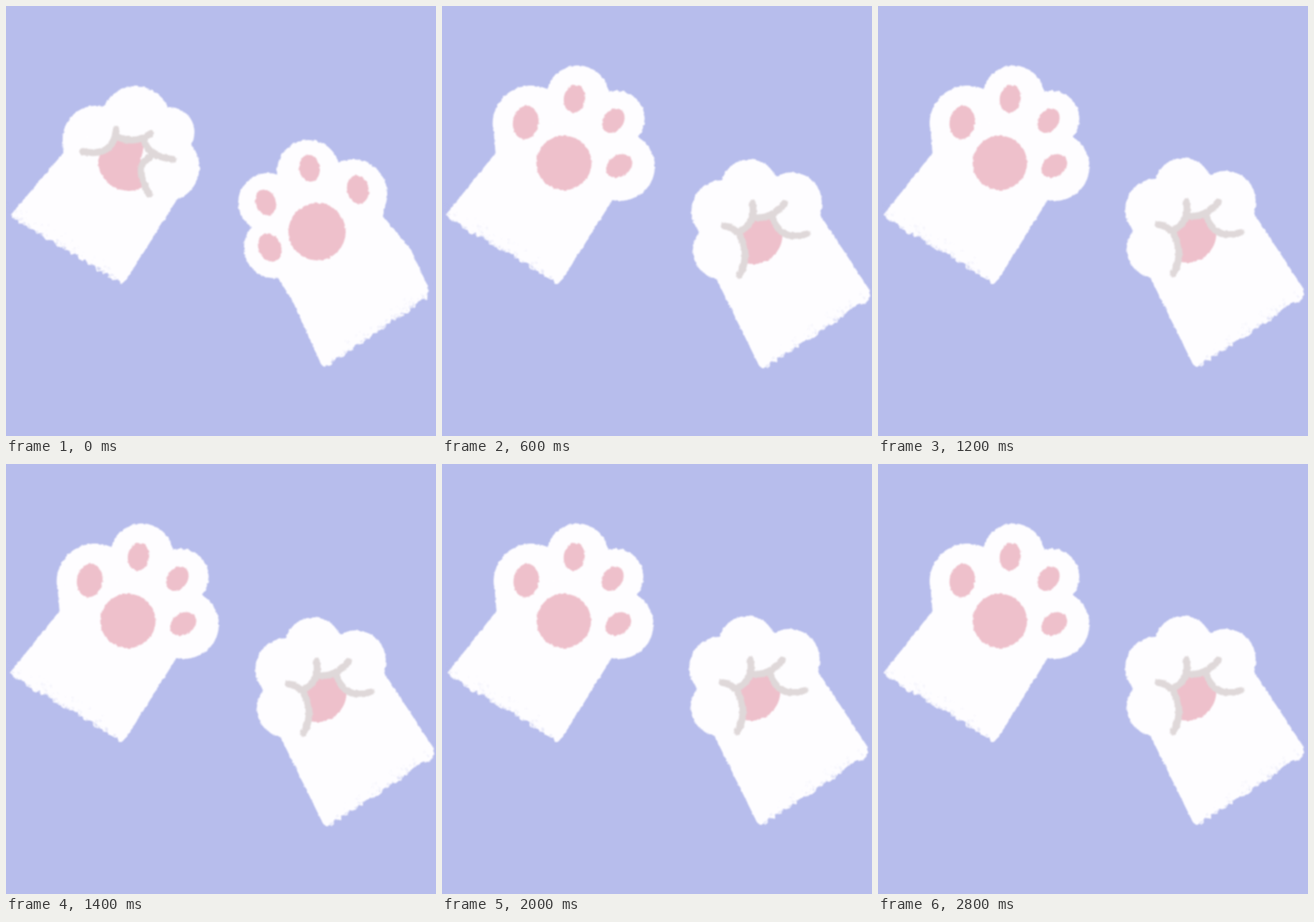
Animation, 600 px wide and 600 px high, one loop 3000 ms. Source, as an HTML page:

```html
<!DOCTYPE html>
<html lang="en">
<head>
<meta charset="utf-8">
<title>Kneading paws</title>
<style>
  html, body { margin: 0; width: 100%; height: 100%; overflow: hidden; background: #b7bdec; }
  svg { display: block; width: 100%; height: 100%; }
  .fur { fill: #fefdff; }
  .pad { fill: #eec0cb; }
  .fold { fill: none; stroke: #dfd8d9; stroke-width: 9.5; stroke-linecap: round; stroke-linejoin: round; }
  .grain { fill: #b7bdec; }
</style>
</head>
<body>
<svg id="stage" viewBox="0 0 600 600">
  <defs>
    <filter id="chalk" filterUnits="userSpaceOnUse" x="0" y="0" width="600" height="600" color-interpolation-filters="sRGB">
      <feTurbulence type="fractalNoise" baseFrequency="0.2" numOctaves="2" seed="4"/>
      <feDisplacementMap in="SourceGraphic" scale="3.5" xChannelSelector="R" yChannelSelector="G"/>
      <feGaussianBlur stdDeviation="0.9"/>
    </filter>
  </defs>
</svg>
<script>
const NS = 'http://www.w3.org/2000/svg';
const stage = document.getElementById('stage');
const STEP = 200, LOOP = 3000;

function add(parent, tag, attrs) {
  const el = document.createElementNS(NS, tag);
  for (const key in attrs) el.setAttribute(key, attrs[key]);
  return parent.appendChild(el);
}

function random(seed) {
  return () => (seed = (seed * 16807) % 2147483647) / 2147483647;
}

function circle(parent, name, [cx, cy, r], opacity = 1) {
  add(parent, 'circle', { class: name, cx, cy, r, opacity });
}

// A pad is a slightly tall ellipse: centre, mean radius, tilt.
function pad(parent, [cx, cy, r, tilt]) {
  add(parent, 'ellipse', {
    class: 'pad', cx, cy, rx: r * 0.86, ry: r * 1.14,
    transform: `rotate(${tilt} ${cx} ${cy})`
  });
}

// Splits the hem into ragged points, each pushed a little along its normal.
function fray([[x0, y0], [x1, y1]], rnd) {
  const length = Math.hypot(x1 - x0, y1 - y0), count = Math.round(length / 4);
  return Array.from({ length: count + 1 }, (_, i) => {
    const t = i / count, push = (rnd() - 0.5) * 6 / length;
    return [x0 + (x1 - x0) * t - (y1 - y0) * push, y0 + (y1 - y0) * t + (x1 - x0) * push];
  });
}

// Chalk gaps, dense at the hem and thinning out up the arm.
function speckle(paw, [[x0, y0], [x1, y1]], rnd) {
  const nx = (y1 - y0) * Math.sign(x0 - x1), ny = -Math.abs(x1 - x0);
  const length = Math.hypot(nx, ny);
  for (let i = 0; i < 90; i++) {
    const t = 0.04 + 0.92 * rnd(), depth = 2 + 40 * rnd() ** 3;
    const x = x0 + (x1 - x0) * t + nx / length * depth;
    const y = y0 + (y1 - y0) * t + ny / length * depth;
    circle(paw, 'grain', [x, y, 0.6 + 1.1 * rnd()], 0.5 / (1 + depth / 8));
  }
}

// Fur is a round toe per digit plus an arm that ends in a frayed hem.
function makePaw({ toes, arm, hem, pads = [], palm, palmPath, folds, seed }) {
  const rnd = random(seed);
  const paw = add(stage, 'g', { filter: 'url(#chalk)', display: 'none' });
  for (const toe of toes) circle(paw, 'fur', toe);
  add(paw, 'polygon', { class: 'fur', points: [...arm, ...fray(hem, rnd)].join(' ') });
  speckle(paw, hem, rnd);
  for (const p of pads) pad(paw, p);
  if (palm) circle(paw, 'pad', palm);
  if (palmPath) add(paw, 'path', { class: 'pad', d: palmPath });
  if (folds) add(paw, 'path', { class: 'fold', d: folds });
  return paw;
}

const leftClosed = makePaw({
  seed: 11,
  toes: [[126, 186, 47], [181, 161, 49], [228, 176, 35], [222, 225, 48]],
  arm: [[168, 382], [238, 271], [228, 176], [79, 186], [80, 205]],
  hem: [[5, 294], [161, 387]],
  palmPath: 'M152 187L195 185L188 215L192 252A42 42 0 0 1 129 211Z',
  folds: 'M107 203Q150 212 154 172M154 182Q180 194 202 178Q193 182 193 188Q198 210 233 214M202 210Q176 222 200 263'
});

const leftOpen = makePaw({
  seed: 23,
  toes: [[125, 164, 53], [189, 126, 43], [242, 157, 39], [247, 224, 48]],
  arm: [[169, 380], [236, 272], [242, 157], [73, 170], [76, 205]],
  hem: [[6, 294], [162, 387]],
  pads: [[117.5, 162.5, 20.5, 8], [184.5, 129.5, 17, 8], [238, 160, 16, 35], [246, 223, 17, 55]],
  palm: [170, 219, 38]
});

const rightOpen = makePaw({
  seed: 37,
  toes: [[375, 337, 43], [365, 274, 41], [422, 231, 44], [484, 262, 48]],
  arm: [[400, 412], [380, 380], [365, 274], [484, 262], [532, 266], [526, 293], [565, 340], [589, 392]],
  hem: [[586, 408], [443, 506]],
  pads: [[368, 337, 18, -25], [362.5, 274, 16, -20], [423.5, 226.5, 16.5, -10], [491, 256, 17.5, -12]],
  palm: [434, 315, 40]
});

const rightClosed = makePaw({
  seed: 41,
  toes: [[388, 339, 41], [388, 284, 43], [426, 252, 40], [485, 272, 42]],
  arm: [[437, 495], [380, 379], [388, 284], [485, 272], [527, 276], [525, 290], [594, 395], [594, 403]],
  hem: [[587, 411], [443, 506]],
  palmPath: 'M413 314L432 296L460 294L472 320A41 41 0 0 1 422 357Z',
  folds: 'M391 305Q403 306 412 317Q428 345 412 374M430 273Q436 300 412 313M434 293Q456 296 475 273M458 293Q470 328 506 316'
});

const paws = [leftClosed, leftOpen, rightOpen, rightClosed];

// Widens a paw sideways while the column at x stays put.
const widen = (x, k) => `translate(${x} 0) scale(${k} 1) translate(${-x} 0)`;

// Each pose is held for two steps; the second is a slight nudge of the first.
const poses = [
  [[leftClosed, ''], [rightOpen, '']],
  [[leftClosed, 'translate(3 1)'], [rightOpen, widen(443, 1.04)]],
  [[leftOpen, ''], [rightClosed, '']],
  [[leftOpen, widen(162, 1.015)], [rightClosed, 'translate(3 2)']]
];

let shown = -1;
function draw(time) {
  const step = Math.floor((time % LOOP) / STEP) % poses.length;
  if (step === shown) return;
  shown = step;
  for (const paw of paws) paw.setAttribute('display', 'none');
  for (const [paw, nudge] of poses[step]) {
    paw.setAttribute('transform', nudge);
    paw.setAttribute('display', 'inline');
  }
}

const start = performance.now();
function tick() {
  draw(performance.now() - start);
  requestAnimationFrame(tick);
}
tick();
</script>
</body>
</html>
```
